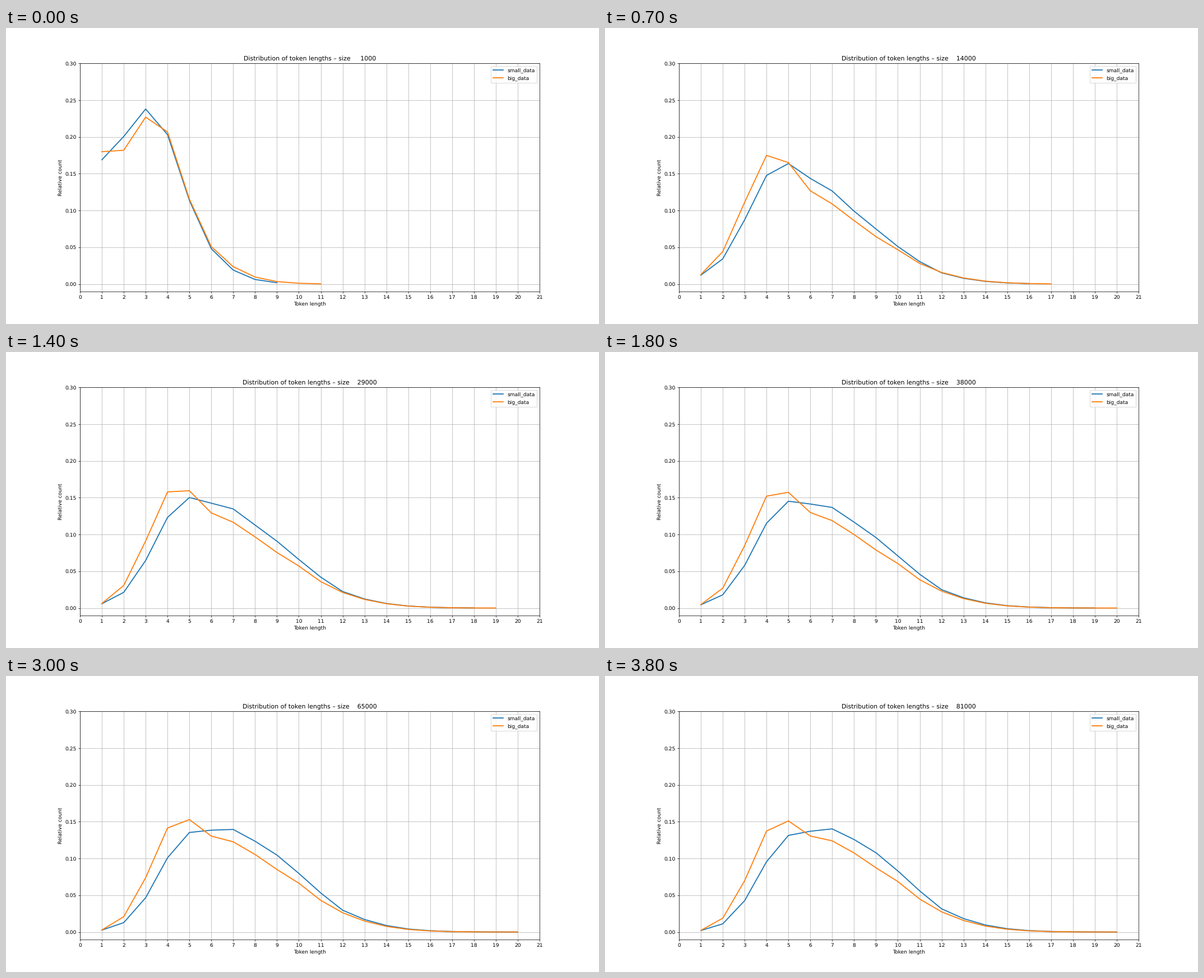
Animation, 1058 px wide and 529 px high, one loop 3900 ms. Source, as a matplotlib script:

```python
import numpy as np
import matplotlib.pyplot as plt
from matplotlib.animation import FuncAnimation

plt.rcParams["font.family"] = "DejaVu Sans"
plt.rcParams["text.hinting"] = "none"

FRAMES, INTERVAL = 39, 100
WIDTH, HEIGHT = 1058, 529
MAX_LENGTH = 20
MID_SIZE = 38  # all sizes are in thousands of tokens


class Series:
    """Token length shares that follow from one profile at MID_SIZE.

    The count of tokens with length L grows as a power of the vocabulary size;
    the power rises with L, and long tokens are rare while the size is small.
    """

    def __init__(self, label, singles, profile, power, half, rarity, longest):
        self.singles = singles    # single-character tokens, a fixed count
        step = np.arange(1, MAX_LENGTH - 11)
        tail = profile[-1] * .56 ** step * .9 ** (step * (step - 1) / 2)
        self.profile = np.concatenate([profile, tail])  # lengths 2 and up
        self.extra = np.arange(1, MAX_LENGTH)
        self.growth = power * self.extra / (self.extra + half) - 1
        self.rarity = rarity
        self.longest = longest    # at size 1, and its gain per log of size
        self.line, = ax.plot([], [], lw=2, label=label)

    def show(self, size):
        scarcity = self.rarity * self.extra ** 2 * (1 / size - 1 / MID_SIZE)
        shares = self.profile * (size / MID_SIZE) ** self.growth * np.exp(-scarcity)
        single = self.singles / size
        shares *= (1 - single) / shares.sum()
        start, gain = self.longest
        end = min(MAX_LENGTH, int(start + gain * np.log(size)))
        self.line.set_data(np.arange(1, end + 1), np.r_[single, shares][:end])


fig, ax = plt.subplots(figsize=(16, 8), dpi=WIDTH / 16)
fig.subplots_adjust(left=132 / WIDTH, right=952 / WIDTH,
                    bottom=58.3 / HEIGHT, top=465.6 / HEIGHT)
series = [
    Series("small_data", .169,
           [.018, .058, .1155, .1455, .1417, .137, .117, .096, .071, .046, .025],
           power=1.5, half=3, rarity=.062, longest=(9, 2.8)),
    Series("big_data", .180,
           [.027, .085, .1523, .1575, .130, .119, .100, .079, .0605, .0385, .023],
           power=1.25, half=1.5, rarity=.05, longest=(11, 2.6)),
]
ax.set(xlim=(0, 21), ylim=(-.01, .3), xticks=range(22),
       xlabel="Token length", ylabel="Relative count")
ax.grid(True)
ax.legend(loc="upper right", labelspacing=.56)
title = ax.set_title("")


def update(frame):
    size = round(np.interp(frame, [0, 4, 25, 30, 38], [1, 8, 53, 65, 81]))
    title.set_text(f"Distribution of token lengths – size {size * 1000:8d}")
    for item in series:
        item.show(size)
    return [title] + [item.line for item in series]


anim = FuncAnimation(fig, update, frames=FRAMES, interval=INTERVAL, repeat=True)
plt.show()
```
